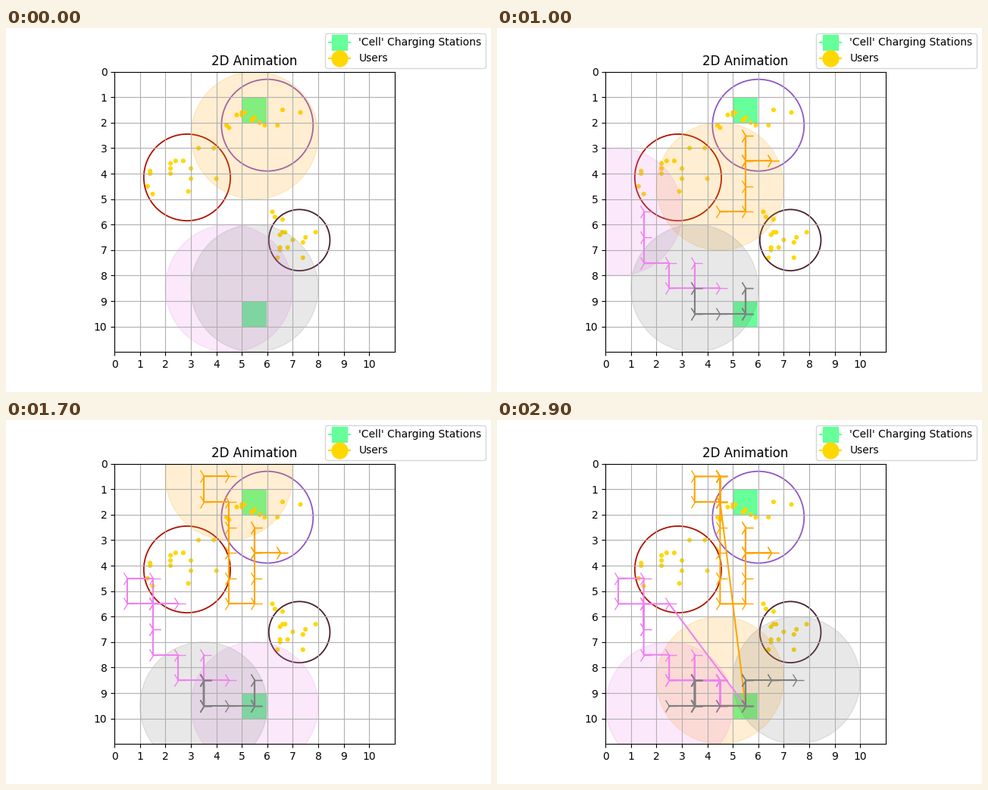
A matplotlib script for the animation above (3000 ms loop, 640 by 480 pixels).

```python
import matplotlib.pyplot as plt
import numpy as np
from matplotlib.animation import FuncAnimation
from matplotlib.lines import Line2D
from matplotlib.patches import Circle, Rectangle

FRAMES = 30
SIZE = 11
REACH = 2.5
STATION = (5.5, 9.5)
USERS_PER_CLUSTER = 15
GREEN, GOLD = "#66ff99", "#ffd700"

# Grid moves: up, down, left, right, stay; C returns to the charging station.
STEPS = {"U": (0, -1), "D": (0, 1), "L": (-1, 0), "R": (1, 0), "S": (0, 0)}
AGENTS = [
    ("orange", (5.5, 2.5),
     "DUDRSLDDL" + "U" * 4 + "LURS" + "DU" * 4 + "DCLU"),
    ("violet", (4.5, 8.5),
     "LSUDLULUULURDDUR" + "CL" + "UD" * 2 + "USLRLLD"),
    ("gray", (5.5, 8.5),
     "DSUDSLL" + "UD" * 6 + "LRUD" + "CURRLR"),
]

# Ring centre, ring radius, ring colour, mean user position, user spread
CLUSTERS = [
    ((2.85, 4.15), 1.7, "#b01000", (2.7, 3.9), (0.8, 0.5)),
    ((6.0, 2.1), 1.8, "#9055c8", (5.7, 1.8), (0.9, 0.3)),
    ((7.26, 6.61), 1.2, "#4a2030", (7.0, 6.4), (0.5, 0.5)),
]


def walk(start, moves):
    """Return the position at every frame."""
    path = [start]
    for move in moves:
        if move == "C":
            path.append(STATION)
        else:
            (x, y), (dx, dy) = path[-1], STEPS[move]
            path.append((x + dx, y + dy))
    return path


fig, ax = plt.subplots(figsize=(6.4, 4.8), dpi=100)
ax.set_aspect("equal")
ax.set_xlim(0, SIZE)
ax.set_ylim(SIZE, 0)
ax.set_xticks(range(SIZE))
ax.set_yticks(range(SIZE))
ax.grid(True)
ax.set_title("2D Animation")

for corner in [(5, 1), (5, 9)]:
    ax.add_patch(Rectangle(corner, 0.97, 1, color=GREEN, lw=0))

rng = np.random.default_rng(4)
for center, radius, color, mean, spread in CLUSTERS:
    # Users stand on a tenth-of-a-cell raster, without far outliers.
    offsets = rng.normal(size=(USERS_PER_CLUSTER, 2)).clip(-1.8, 1.8)
    for user in np.round(mean + offsets * spread, 1):
        ax.add_patch(Circle(user, 0.09, color=GOLD, lw=0))
    ax.add_patch(Circle(center, radius, fill=False, ec=color, lw=1.3))

agents = []
for color, start, moves in AGENTS:
    area = ax.add_patch(Circle(start, REACH, color=color, alpha=0.18))
    trail, = ax.plot([], [], color=color, marker="4", ms=15)
    agents.append((walk(start, moves), area, trail))

fig.legend(handles=[
    Line2D([], [], color=GREEN, marker="s", ms=15,
           label="'Cell' Charging Stations"),
    Line2D([], [], color=GOLD, marker="o", ms=15, label="Users"),
], loc="upper right")


def update(frame):
    for path, area, trail in agents:
        area.center = path[frame]
        visited = path[:frame]
        trail.set_data([p[0] for p in visited], [p[1] for p in visited])
    return [artist for _, *pair in agents for artist in pair]


anim = FuncAnimation(fig, update, frames=FRAMES, interval=100,
                     repeat=True, repeat_delay=0, blit=False)
plt.show()
```
